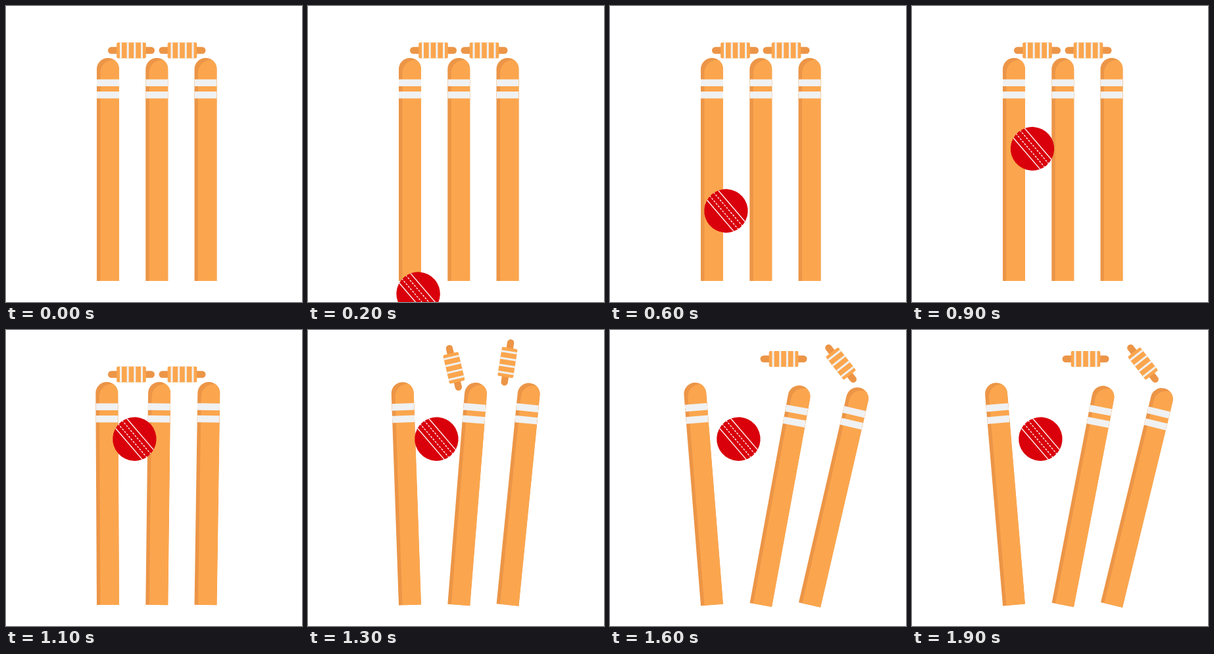
An HTML page with a canvas that plays this animation: 450x450 px, repeating every 2200 ms.

```html
<!DOCTYPE html>
<html lang="en">
<head>
<meta charset="utf-8">
<title>Bowled</title>
<style>
html, body { margin: 0; width: 100%; height: 100%; overflow: hidden; background: #fff; }
canvas { display: block; width: 100vmin; height: 100vmin; }
</style>
</head>
<body>
<canvas id="stage"></canvas>
<script>
const SIZE = 450, LOOP = 2200, STEP = 100;
const ORANGE = '#fba64e', SHADE = '#ec9547', PALE = '#f0f1f2', RED = '#d9000b';

const canvas = document.getElementById('stage');
const ctx = canvas.getContext('2d');

const stumps = [
  { x: 155, turn: -4.8 },
  { x: 229.3, turn: 10.95 },
  { x: 303.5, turn: 13.7 }
];
// Each bail flies along x, with height = 67.5 - rise * u + fall * u².
const bails = [
  { x: 190.5, dx: 73.5, rise: 23.5, fall: 0, turn: 180 },
  { x: 268, dx: 83, rise: 61.9, fall: 45.4, turn: 232 }
];

const lerp = (a, b, u) => a + (b - a) * u;
const progress = (t, from, to) => Math.min(1, Math.max(0, (t - from) / (to - from)));

function place(x, y, degrees, draw) {
  ctx.save();
  ctx.translate(x, y);
  ctx.rotate(degrees * Math.PI / 180);
  draw();
  ctx.restore();
}

function box(x, y, w, h, color, radius = 0) {
  ctx.fillStyle = color;
  ctx.beginPath();
  ctx.roundRect(x, y, w, h, radius);
  ctx.fill();
}

// Origin at the middle of the foot.
function drawStump() {
  ctx.beginPath();
  ctx.roundRect(-17, -339, 34, 339, [17, 17, 0, 0]);
  ctx.fillStyle = SHADE;
  ctx.fill();
  ctx.clip();
  ctx.fillStyle = ORANGE;
  ctx.beginPath();
  ctx.moveTo(-11.5, 0);
  ctx.lineTo(-11.5, -316);
  ctx.bezierCurveTo(-11.5, -328, -3, -336, 9, -336);
  ctx.lineTo(17, -336);
  ctx.lineTo(17, 0);
  ctx.fill();
  box(-17, -306.5, 34, 10.5, PALE);
  box(-17, -288, 34, 10.5, PALE);
}

function drawBail() {
  box(-35.5, -5.2, 71, 10.4, SHADE, 5.2);
  box(-22.3, -12, 44.6, 24, ORANGE, 2);
  for (const x of [-16, -5.3, 5.3, 16]) box(x - 1.5, -12, 3, 24, PALE);
}

function drawBall() {
  ctx.fillStyle = RED;
  ctx.beginPath();
  ctx.arc(0, 0, 33.2, 0, Math.PI * 2);
  ctx.fill();
  ctx.clip();
  ctx.strokeStyle = '#fff';
  ctx.lineWidth = 1.3;
  for (const y of [-11.3, -4, 4, 11.3]) {
    ctx.setLineDash(Math.abs(y) < 5 ? [3, 2] : []);
    ctx.beginPath();
    ctx.moveTo(-34, y);
    ctx.lineTo(34, y);
    ctx.stroke();
  }
}

function ballAt(t) {
  if (t < 900) {
    const u = (t - 400) / 500;
    return [lerp(172, 183, u), lerp(374.5, 217, u)];
  }
  const u = progress(t, 900, 1062);
  return [lerp(183, 195.4, u), lerp(217, 165.7, u)];
}

function render(t) {
  const scale = canvas.width / SIZE;
  ctx.setTransform(scale, 0, 0, scale, 0, 0);
  ctx.fillStyle = '#fff';
  ctx.fillRect(0, 0, SIZE, SIZE);

  const lean = progress(t, 1065, 1628);
  for (const s of stumps) place(s.x, 418, s.turn * lean, drawStump);

  const u = progress(t, 1100, 1569);
  for (const b of bails) {
    place(b.x + b.dx * u, 67.5 - b.rise * u + b.fall * u * u, b.turn * u, drawBail);
  }

  if (t > 0) place(...ballAt(t), 49.4, drawBall);
}

function resize() {
  const side = Math.min(innerWidth, innerHeight) || SIZE;
  canvas.width = canvas.height = Math.round(side * (window.devicePixelRatio || 1));
}

const start = performance.now();
function tick() {
  const t = Math.max(0, performance.now() - start) % LOOP;
  render(Math.floor(t / STEP) * STEP);
  requestAnimationFrame(tick);
}

addEventListener('resize', resize);
resize();
tick();
</script>
</body>
</html>
```
